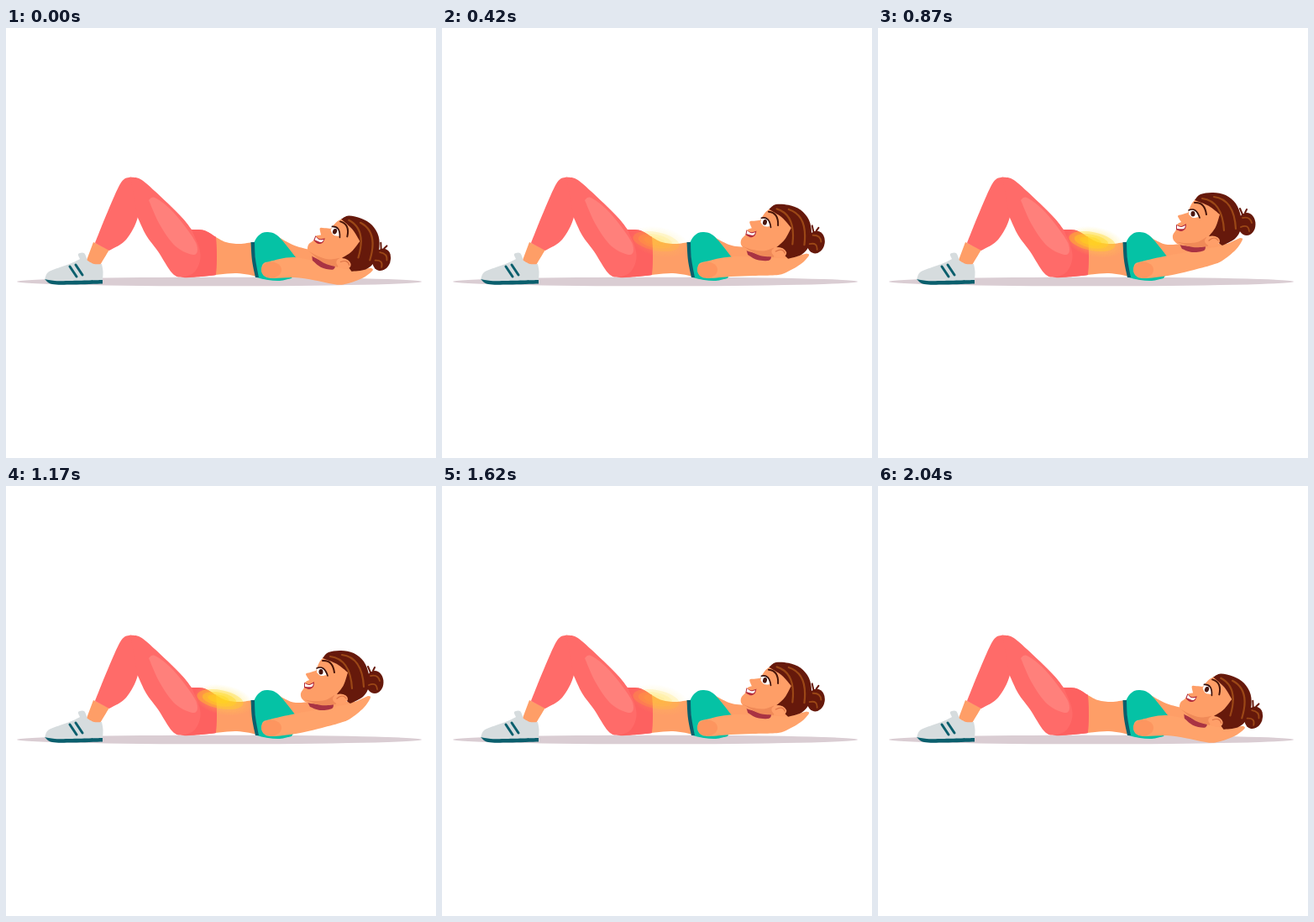
These frames come from a looping animation (512x512 px, 2250 ms). An HTML page:

```html
<!DOCTYPE html>
<html lang="en">
<head>
<meta charset="utf-8">
<title>Crunches</title>
<style>
html, body { margin: 0; width: 100%; height: 100%; overflow: hidden; background: #fff; }
svg { display: block; width: 100%; height: 100%; }
.line { fill: none; stroke-linecap: round; stroke-linejoin: round; }
.skin { fill: #fe9e67; }
.coral { fill: #ff6b69; }
.teal { fill: #0a5f6d; }
.hair { fill: #66190b; }
</style>
</head>
<body>
<!-- data-k holds key points of a smooth outline; a slash marks a corner. -->
<svg viewBox="0 0 512 512">
  <defs>
    <radialGradient id="halo">
      <stop offset="0" stop-color="#ffd51f" stop-opacity=".6"/>
      <stop offset="1" stop-color="#ffe34d" stop-opacity="0"/>
    </radialGradient>
  </defs>

  <ellipse cx="254" cy="302" rx="241" ry="5.3" fill="#dacdd3"/>

  <path class="skin" data-k="104,255 / 123,264 / 111,284 / 95,279"/>
  <path fill="#d6dcde" data-k="46,300 50,291 64,285 78,280 88,275 / 86,269 93,268 97,277 / 105,281 114,281 / 115.5,290 115,302 / 60,303"/>
  <path class="teal" data-k="46,299 58,301 75,301 115,300 / 115,304.5 / 80,305.5 55,305 46,299"/>
  <path class="line" stroke="#0a5f6d" stroke-width="3" stroke-linecap="butt" d="M76 284l8 12m-1-14l8 12"/>

  <path class="coral" data-k="106,256 120.5,220 137,184 148,177.5 / 157,195 157,225 143,252 123,265"/>
  <path class="skin" data-k="248,248 262,255 278,257 294,255 / 300,296 / 275,292 248,294"/>
  <path class="coral" data-k="148,177.5 160,180 177,194 208,224 221,240 / 236,241 250,249 / 251,272 250,294 / 232,296 211,297 198,292 181,266 167,247 157,226 / 148,177.5"/>
  <path fill="#fd6160" data-k="221,240 236,241 250,249 / 251,272 250,294 / 232,296 211,297 / 224,291 231,277 230,262 221,240"/>
  <path fill="#ff807b" data-k="170,205 177,202 195,215 213,236 227,258 224,270 202,260 183,234 170,205"/>

  <path class="skin" data-bend data-k="318,245 333,254 345,258 362,257 / 418,257 / 408,270 / 345,292 / 318,288"/>
  <path fill="#05c2a5" data-k="295,256 299,249 305,244 312,243 320,245 329,253 345,273 / 347,285 340,298 / 326,301 312,300 298,297"/>
  <path class="teal" data-k="291.5,255 / 296,255 / 297,275 301,297 / 297,297 / 293,277 291.5,255"/>
  <path fill="#ffa36b" data-bend data-k="304,288 306,281 314,278 345,271 390,263 410,259 431,250 / 434,252 426,264 410,277 398,282 372,289 345,295 317,298 307,295 304,288"/>
  <ellipse cx="316" cy="288" rx="12" ry="9.5" fill="#fd955f"/>

  <g id="head">
    <path fill="#a93343" data-k="359,257 372,260 390,259 / 388,265 374,267 362,263"/>
    <path class="skin" data-k="378,204 373,210 369,220 / 362,222 357,224 361,231 / 356,234 355,240 351,247 353,254 363,259 393,260 / 411,246 / 407,218"/>
    <path fill="#f08a58" data-k="354,254 366,256 380,255 391,249 / 393,260 / 375,261 354,254"/>
    <path class="hair" data-k="377,205 384,198 399,196 414,199 426,209 432,224 432,239 425,251 410,259 / 394,248 / 402,237 407,222 / 394,212 377,205"/>
    <g id="strands" class="line" stroke="#9b4716" stroke-width="2.2"></g>
    <ellipse class="hair" cx="439" cy="233.5" rx="10.500" ry="13.500"/>
    <path class="line" stroke="#66190b" stroke-width="2" d="M434 222l-3-7m6 5l2-4"/>
    <path class="line" stroke="#9b4716" stroke-width="1.800" d="M434 226q9-2 11 6m-13 5q9-4 10 5"/>
    <ellipse cx="398" cy="253.500" rx="9" ry="6" fill="#ff9f69"/>
    <path class="line" stroke="#dd7447" stroke-width="1.200" d="M394 253q7-6 11 0"/>
    <path fill="#fff" data-k="370,217 377,217 382,225 / 375,226 370,222"/>
    <ellipse cx="375" cy="221.300" rx="2.500" ry="3.300" fill="#4b1710"/>
    <path class="line" stroke="#35100d" stroke-width="1.600" d="M370 217q9-4 13 9"/>
    <path class="line" stroke="#481509" stroke-width="2" d="M377 208q12-1 14 14"/>
    <path fill="#b32d3c" data-k="355,234 361,236 367,233 / 366,239 361,242 355,240"/>
    <path fill="#fff" data-k="356,235 361,237 366,235 / 364,239 356,239"/>
  </g>

  <g id="glow" transform="rotate(11 255 254)" fill="#ffd61c">
    <ellipse cx="259" cy="254" rx="36" ry="18" fill="url(#halo)"/>
  </g>
</svg>
<script>
const LOOP = 2250, STEP = 30, MOVE = 900, RETURN_AT = 1140;
const SWING = -21, RAISED = 0.967;
const PIVOT = { x: 325, y: 278 };
const SHOULDER = 310, ELBOW = 400;
const part = id => document.getElementById(id);

function addTo(parent, tag, attrs) {
  const node = document.createElementNS("http://www.w3.org/2000/svg", tag);
  for (const name in attrs) node.setAttribute(name, attrs[name]);
  parent.append(node);
}

function readKeys(text) {
  return text.split("/").map(run => run.trim().split(/\s+/).map(pair => {
    const [x, y] = pair.split(",").map(Number);
    return { x, y };
  }));
}

// Catmull-Rom curve through each run of points, with corners between runs.
function outline(runs) {
  const at = (x, y) => x.toFixed(2) + " " + y.toFixed(2);
  let last = runs[0][0];
  let d = "M" + at(last.x, last.y);
  runs.forEach((run, n) => {
    const p = n ? [last, ...run] : run;
    for (let i = 0; i < p.length - 1; i++) {
      const a = p[i], b = p[i + 1];
      const before = p[i - 1] || a, after = p[i + 2] || b;
      d += "C" + at(a.x + (b.x - before.x) / 6, a.y + (b.y - before.y) / 6)
        + " " + at(b.x - (after.x - a.x) / 6, b.y - (after.y - a.y) / 6)
        + " " + at(b.x, b.y);
    }
    last = p[p.length - 1];
  });
  return d + "Z";
}

// The swing grows smoothly from the shoulder to the elbow.
function bend({ x, y }, angle) {
  const t = Math.min(1, Math.max(0, (x - SHOULDER) / (ELBOW - SHOULDER)));
  const a = angle * 0.93 * t * t * (3 - 2 * t) * Math.PI / 180;
  const dx = x - PIVOT.x, dy = y - PIVOT.y;
  const c = Math.cos(a), s = Math.sin(a);
  return { x: PIVOT.x + dx * c - dy * s, y: PIVOT.y + dx * s + dy * c };
}

function lift(time) {
  const t = Math.floor(time / STEP) * STEP;
  return t <= RETURN_AT
    ? Math.min(1, t / MOVE)
    : Math.max(0, 1 - (t - RETURN_AT) / MOVE);
}

const shapes = [...document.querySelectorAll("[data-k]")]
  .map(node => ({ node, runs: readKeys(node.dataset.k) }));
const bending = shapes.filter(({ node }) => "bend" in node.dataset);
shapes.forEach(({ node, runs }) => node.setAttribute("d", outline(runs)));

for (let i = 0; i < 2; i++) {
  addTo(part("strands"), "path", { d: `M${386 + 14 * i} ${203 - 2 * i}q24 3 26 38` });
}
for (let i = 0; i < 3; i++) {
  addTo(part("glow"), "ellipse", {
    cx: 255 - i, cy: 254, rx: 28 - 7.5 * i, ry: 11 - 3 * i, opacity: 0.36 + 0.04 * i
  });
}

function draw(time) {
  const u = lift(time % LOOP);
  const angle = SWING * (u - RAISED);
  part("head").setAttribute("transform", `rotate(${angle} ${PIVOT.x} ${PIVOT.y})`);
  for (const { node, runs } of bending) {
    node.setAttribute("d", outline(runs.map(run => run.map(p => bend(p, angle)))));
  }
  part("glow").setAttribute("opacity", u);
}

const start = performance.now();
function tick() {
  draw(performance.now() - start);
  requestAnimationFrame(tick);
}
tick();
</script>
</body>
</html>
```
